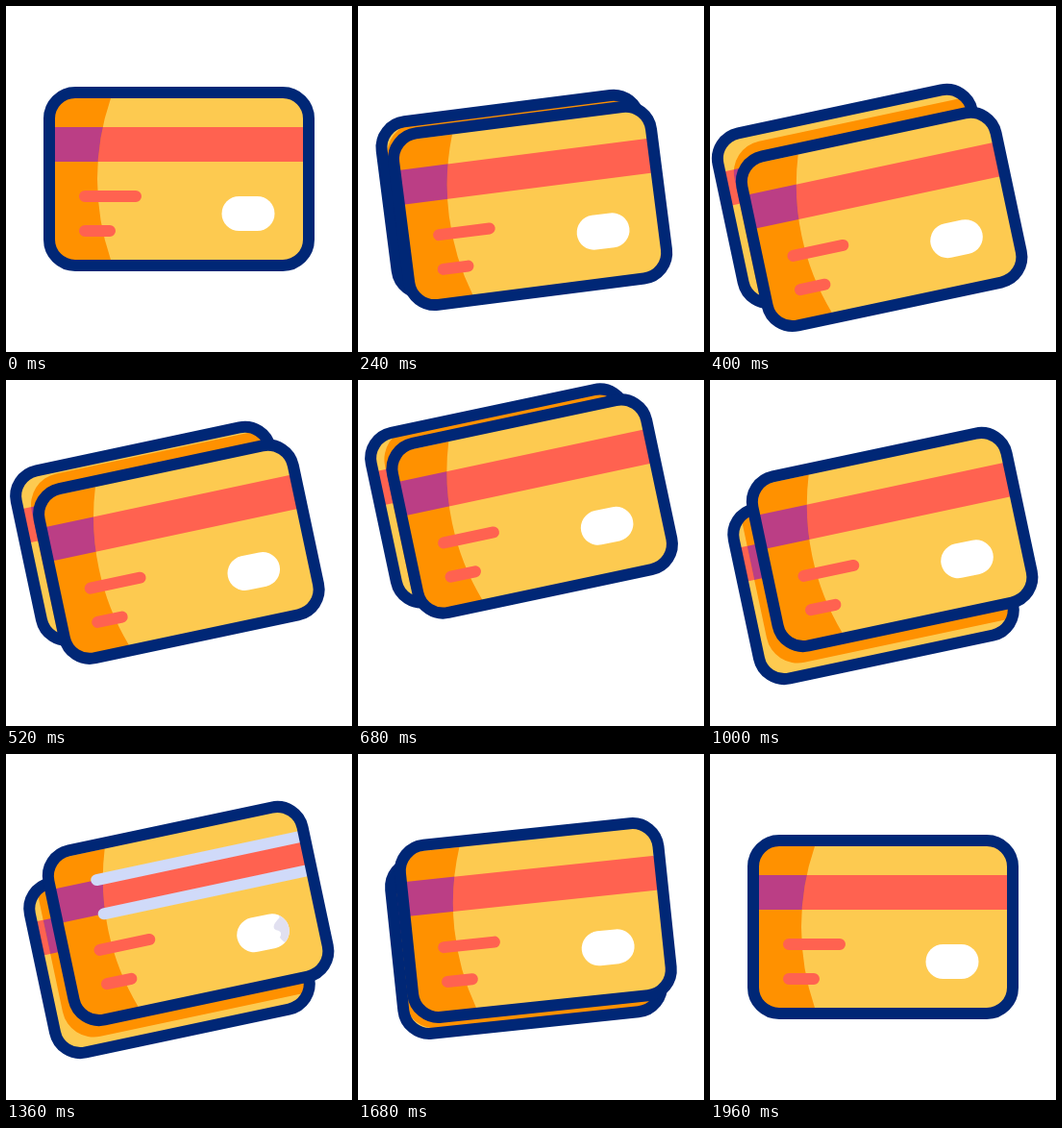
Write an HTML page that moves like this. It is 360 px wide and 360 px high and loops after 2000 ms.

```html
<!DOCTYPE html>
<html lang="en">
<head>
<meta charset="utf-8">
<title>Bank cards</title>
<style>
  html, body { margin: 0; width: 100%; height: 100%; overflow: hidden; background: #fff; }
  svg { display: block; width: 100vw; height: 100vh; }
  .yellow { fill: #fdca50; }
  .orange { fill: #ff9100; }
  .red { fill: #ff6250; }
  .purple { fill: #bb3e85; }
  .edge { fill: none; stroke: #002776; stroke-width: 12; }
  .print { stroke: #ff6250; stroke-width: 12; stroke-linecap: round; }
  .glint { stroke: #d0daf9; stroke-width: 12; stroke-linecap: round; }
</style>
</head>
<body>
<!-- Card artwork is centred on 0,0 -->
<svg viewBox="0 0 360 360">
  <defs>
    <rect id="body" x="-135" y="-90" width="270" height="180" rx="27"/>
    <rect id="stripe" x="-135" y="-54" width="270" height="36"/>
    <rect id="chip" x="44.5" y="18" width="55" height="36" rx="18"/>
    <clipPath id="inBody"><use href="#body"/></clipPath>
    <clipPath id="inChip"><use href="#chip"/></clipPath>
    <clipPath id="inPanel"><path d="M-140-84H-71A259 259 0 0 0-71 84L-66 96H-140V-96H-66Z"/></clipPath>
    <clipPath id="inShade"><rect id="shade" x="-141" y="-96" width="282" height="192" rx="33"/></clipPath>
    <g id="base">
      <use href="#body" class="yellow"/>
      <use href="#stripe" class="red"/>
    </g>
    <g id="tint">
      <use href="#body" class="orange"/>
      <use href="#stripe" class="purple"/>
    </g>
  </defs>

  <g id="back">
    <g clip-path="url(#inBody)">
      <use href="#base"/>
      <g clip-path="url(#inShade)"><use href="#tint"/></g>
    </g>
    <use href="#body" class="edge"/>
  </g>

  <g id="front">
    <g clip-path="url(#inBody)">
      <use href="#base"/>
      <g clip-path="url(#inPanel)"><use href="#tint"/></g>
      <path class="print" d="M-98 18H-45M-98 54H-72"/>
      <use href="#chip" fill="#fff"/>
      <g clip-path="url(#inChip)">
        <path id="shine" fill="#e1e0f0"
          d="M92 10V24Q80 32 86 36Q93 39 88 44Q90 49 96 54H125V10Z"/>
      </g>
      <path id="glints" class="glint"/>
    </g>
    <use href="#body" class="edge"/>
  </g>
</svg>

<script>
const LOOP = 2000, STEP = 40;
const el = id => document.getElementById(id);

// Eased 0 to 1 between two times
function ramp(t, from, to) {
  const p = Math.min(1, Math.max(0, (t - from) / (to - from)));
  return p * p * (3 - 2 * p);
}

function move(id, x, y, tilt = 0) {
  el(id).setAttribute('transform', `translate(${x} ${y}) rotate(${tilt})`);
}

function draw(t) {
  const dip = ramp(t, 80, 360), lift = ramp(t, 360, 680);
  const settle = ramp(t, 680, 1000), away = 1 - ramp(t, 1400, 1960);
  const split = ramp(t, 80, 400), rise = ramp(t, 400, 680);

  const tilt = -12 * dip * away;
  const x = 180 + away * (-1.5 * dip + 2.7 * lift + 8.4 * settle);
  const y = 180 + away * (46 * dip - 94.5 * lift + 34.5 * settle);
  const dx = away * (-25 * split + 2.7 * rise + 2.7 * settle);
  const dy = away * (-24 * split + 13 * rise + 45 * settle);
  move('front', x, y, tilt);
  move('back', x + dx, y + dy, tilt);
  el('back').style.visibility = dx || dy ? 'visible' : 'hidden';

  // The shade follows the front card, seen from the back card's own axes
  const r = tilt * Math.PI / 180, c = Math.cos(r), s = Math.sin(r);
  const sx = away * -8 * settle, sy = away * (20 * settle - 10 * split);
  move('shade', sx - dx * c - dy * s, sy - dy * c + dx * s);

  const tip = 145 - 231 * (ramp(t, 1000, 1360) - ramp(t, 1400, 1720));
  const gleam = ramp(t, 1240, 1360) - ramp(t, 1400, 1520);
  el('glints').setAttribute('d', `M${tip}-54H160M${tip}-18H160`);
  move('shine', 24 * (1 - gleam), 0);
}

const start = performance.now();
function tick() {
  const t = (performance.now() - start) % LOOP;
  draw(Math.floor(t / STEP) * STEP);
  requestAnimationFrame(tick);
}
tick();
</script>
</body>
</html>
```
